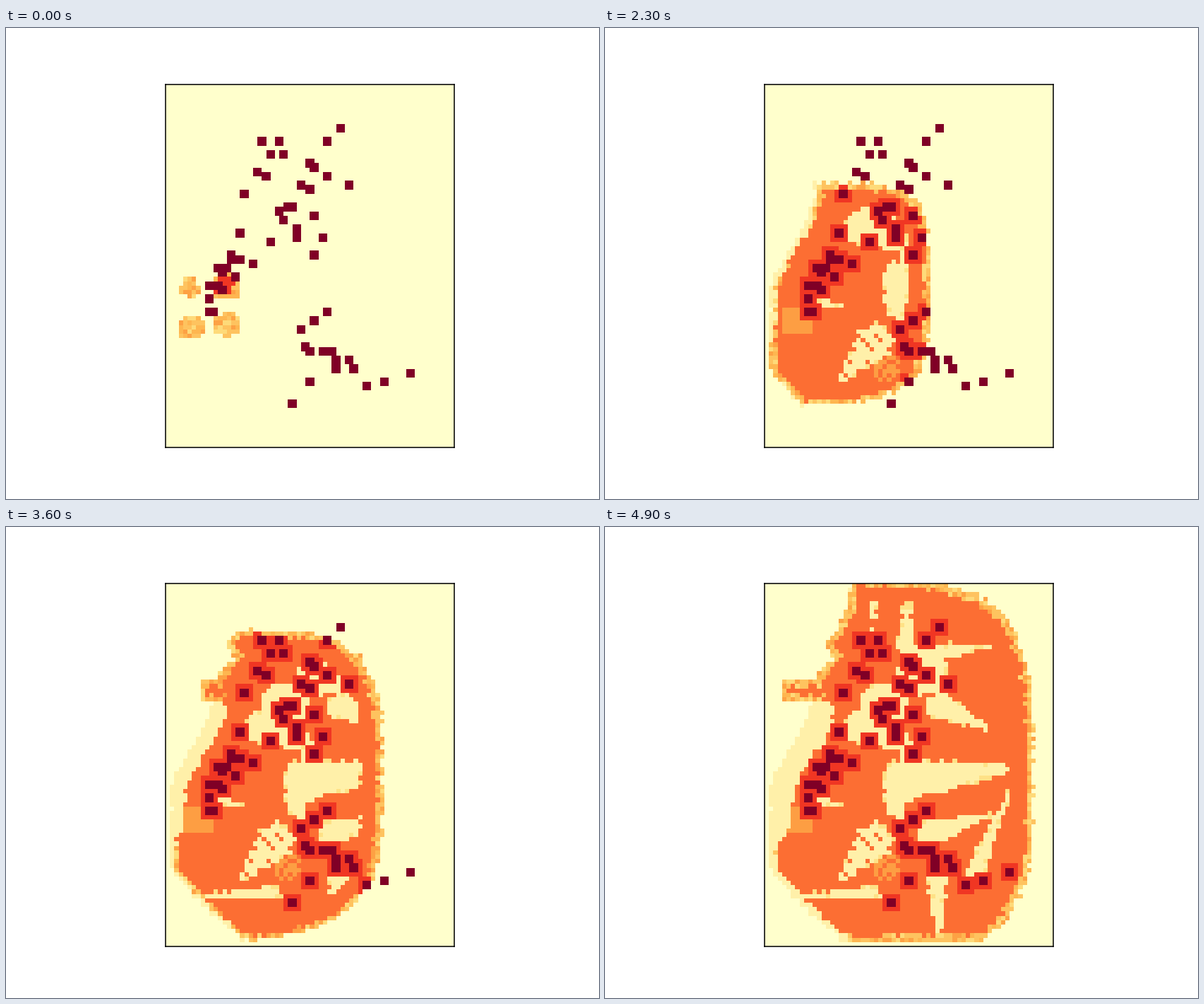
Recreate the animation shown at these times as a matplotlib script. Size 840x667 px, loop 5 s.

```python
import numpy as np
import matplotlib.pyplot as plt
from matplotlib.animation import FuncAnimation

ROWS, COLS, FRAMES = 83, 66, 50
PALE, AMBER, ORANGE, RED, DARK = 0.1, 0.44, 0.56, 0.68, 1.0
RIM_SHADES = [0.24, 0.32, 0.32, 0.36, 0.43]
SPEED = 0.9         # cells the front advances per frame
DOWN_COST = 1.35    # growth towards the bottom is slower
GAP_LAG = 5         # cells behind the front where trails start to fade

# Food blocks, two cells wide: (column, row) of each centre
FOOD = [
    (40, 10), (22, 13), (26, 13), (37, 13), (24, 16), (27, 16), (33, 18),
    (34, 19), (21, 20), (23, 21), (37, 21), (31, 23), (42, 23), (33, 24),
    (18, 25), (28, 28), (29, 28), (26, 29), (34, 30), (27, 31), (30, 33),
    (17, 34), (30, 35), (36, 35), (24, 36), (15, 39), (34, 39), (15, 40),
    (17, 40), (20, 41), (12, 42), (14, 42), (13, 43), (16, 44), (10, 46),
    (12, 46), (13, 47), (10, 49), (10, 52), (11, 52), (37, 52), (34, 54),
    (31, 56), (32, 60), (33, 61), (36, 61), (38, 61), (39, 63), (42, 63),
    (39, 65), (43, 65), (56, 66), (33, 68), (50, 68), (46, 69), (29, 73)]

# Colonies that spread: column, row, first radius, roundness exponent
COLONIES = [(5.5, 47, 2.5, 2), (6, 56, 3, 2),
            (14, 46.5, 3.3, 4), (14, 55.5, 3, 2.5)]

# Faded trails that taper to a tip: start, tip, start radius
TRAILS = [
    ((36, 20), (27, 27), 6), ((27, 29), (24, 35), 6), ((22, 33), (31, 38), 4),
    ((40, 28), (51, 33), 3), ((38, 15.5), (51, 14.5), 2),
    ((32, 45), (59, 42), 5), ((30, 49), (31, 56), 3), ((33, 41), (32, 34), 3),
    ((38, 57), (52, 53), 3), ((25, 59), (17, 68), 4.5),
    ((25, 70.5), (9, 71.5), 1.5), ((39.5, 68), (40, 82), 2.2),
    ((48, 66), (56, 48), 2), ((25, 1), (25, 11), 1),
    ((32.5, 14), (32.5, 3), 2), ((12, 50), (18, 50.5), 1)]

row, col = np.mgrid[:ROWS, :COLS]
x, y = col + 0.5, row + 0.5

# Left limit of the growth, and how far the living body draws back from it
wall = np.interp(y, [0, 8, 14, 17, 21, 26, 30, 34, 41, 47, 65, 73, 82],
                 [20, 18, 14, 16, 12, 11.5, 10, 8, 3.5, 1, 1, 8, 18])
retreat = np.interp(y, [26, 28, 34, 56, 60, 82], [0, 5, 7, 5, 1.5, 2])


def trail_depth(start, tip, radius):
    """Distance inside a stroke that narrows from start to tip."""
    (x0, y0), (x1, y1) = start, tip
    dx, dy = x1 - x0, y1 - y0
    along = np.clip(((x - x0) * dx + (y - y0) * dy) / (dx**2 + dy**2), 0, 1)
    away = np.hypot(x - x0 - along * dx, y - y0 - along * dy)
    return radius + (0.4 - radius) * along - away


def front_depth(frame):
    """Distance behind the advancing front, positive once it has passed."""
    depths = []
    for cx, cy, radius, power in COLONIES:
        down = np.where(y > cy, DOWN_COST, 1) * np.abs(y - cy)
        away = (np.abs(x - cx)**power + down**power)**(1 / power)
        depths.append(radius + SPEED * frame - away)
    return np.max(depths, axis=0)


def box(left, top, right, bottom):
    return (col >= left) & (col < right) & (row >= top) & (row < bottom)


food = np.zeros((ROWS, COLS), bool)
halo = np.zeros((ROWS, COLS), bool)
for fx, fy in FOOD:
    food |= box(fx - 1, fy - 1, fx + 1, fy + 1)
    halo |= box(fx - 2, fy - 2, fx + 2, fy + 2)

trails = np.max([trail_depth(*t) for t in TRAILS], axis=0)
grain = np.random.default_rng(4).random((ROWS, COLS))
jitter = 0.9 * (grain - 0.5)
streaks = box(14, 55, 31, 70) & ((row - col) % 4 == 0) & (grain > 0.4)
amber = box(4, 51, 11, 57) | box(24, 61, 32, 68) & (grain > 0.5)


def render(frame):
    flicker = np.random.default_rng(100 + frame).random((ROWS, COLS))
    front = front_depth(frame)

    # A thin arm creeps past the left limit
    arm = np.minimum(2.5 - np.abs(y - 24.5), x - 18.5 + 0.3 * frame)
    limit = np.maximum(0.8 * (x - wall), arm)
    edges = np.minimum(x - 1, ROWS - 1 - y)
    reach = np.minimum.reduce([front, limit, edges]) + jitter

    age = max(0, frame - 15) / (FRAMES - 16)
    alive = (reach > 0) & ((x - wall - retreat * age + jitter > 0) | (arm > 0))
    gap = np.minimum(trails, front - GAP_LAG) + jitter
    hollow = alive & (gap > 0)
    rim_width = 1.5 + 4 * max(0, 1 - frame / 3)
    rim = alive & (reach < rim_width)

    image = np.where(reach > 0, PALE, 0.0)
    image[alive] = ORANGE
    image[alive & amber] = AMBER
    image[hollow] = PALE
    image[hollow & (gap < 0.4) & (flicker > 0.6)] = 0.2
    image[hollow & streaks] = ORANGE
    image[rim] = np.choose((flicker * 5).astype(int), RIM_SHADES)[rim]
    image[halo & (reach > 0.9)] = RED
    image[food] = DARK
    return image


fig, ax = plt.subplots(figsize=(8.4, 6.67), dpi=100)
ax.set(xticks=[], yticks=[])
ax.spines[:].set_linewidth(1.12)
picture = ax.imshow(render(0), cmap="YlOrRd", vmin=0, vmax=1,
                    interpolation="nearest")


def update(frame):
    picture.set_data(render(frame))
    return [picture]


anim = FuncAnimation(fig, update, frames=FRAMES, interval=100, repeat=True,
                     repeat_delay=0)
plt.show()
```
